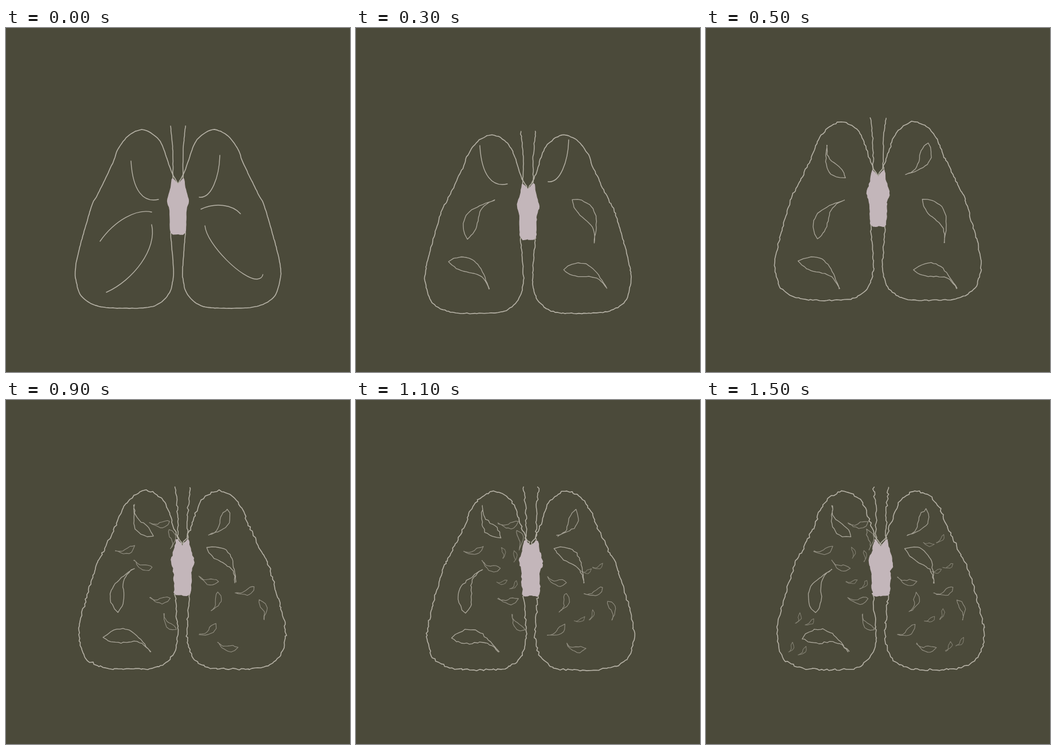
An HTML page with a canvas that plays this animation: 600 px wide and 600 px high, repeating every 1700 ms.

```html
<!DOCTYPE html>
<html lang="en">
<head>
<meta charset="utf-8">
<title>Breathing lungs</title>
<style>
  html, body { margin: 0; width: 100%; height: 100%; overflow: hidden; background: #4b4a3a; }
  canvas { display: block; }
</style>
</head>
<body>
<canvas id="stage" width="600" height="600"></canvas>
<script>
const ctx = document.getElementById('stage').getContext('2d');
const LOOP = 1700;
const STEP = 200;
const FULL_BREATH = 7;
const COLORS = { back: '#4b4a3a', line: '#b6b2a6', heart: '#c3b6ba' };

// Centre x and lung top for each step of the breath.
const POSES = [[300, 178], [304, 162], [300, 187], [300, 164], [307, 159],
  [307.5, 158.5], [304.5, 160], [304.5, 143.5], [304.5, 159.5]];

// Key points of the left half at rest; the right half is mirrored about x = 300.
const LUNG = [[300, 272], [288, 249], [273, 206], [262, 190], [245, 179], [232, 178], [212, 189],
  [195, 212], [186, 236], [160, 290], [149, 312], [128, 385], [121, 420], [122, 440], [131, 467],
  [152, 482], [180, 488], [242, 488], [268, 480], [285, 462], [291, 440], [292, 420], [287, 357]];
const TRACHEA = [[287, 171], [291, 215], [291, 263]];
const HEART = [[300, 272], [290, 262], [287, 278], [281, 302], [285, 318], [287, 357], [300, 360]];

const UPPER_VEINS = new Path2D('M218 232C221 285 240 305 266 299M373 222C372 260 358 298 337 295');
const LOWER_VEINS = new Path2D('M164 372C190 335 228 315 254 321M340 316C365 304 395 308 409 324' +
  'M175 461C222 440 264 385 254 343M347 345C350 378 414 440 438 438Q447 437 448 430');

// Leaves: centre x, y, direction in degrees from blunt to sharp end, length.
const YOUNG_LEAVES = [[227, 233, 240, 65], [368, 228, 125, 68], [218, 334, 305, 83],
  [396, 337, 63, 85], [197, 431, 34, 86], [400, 438, 23, 82]];
const GROWN_LEAVES = [[233, 230, 239, 64], [362, 232, 125, 56], [202, 352, 290, 82],
  [367, 307, 50, 79], [204, 446, 16, 85]];
const SIDE_LEAVES = [[261, 232, 176], [346, 331, 195], [278, 262, 85], [356, 371, 110],
  [201, 278, 167], [409, 350, 162], [232, 305, 203], [437, 385, 76],
  [261, 364, 181], [344, 419, 148], [279, 406, 232], [379, 447, 194]];
const BUD_PAIRS = [[261, 288], [260, 337], [407, 311], [395, 396],
  [167, 402], [393, 264], [154, 453], [427, 444]];

let seed = 1;
function random(low, high) {
  seed = (seed * 16807) % 2147483647;
  return low + (high - low) * seed / 2147483647;
}

const mirror = points => points.map(([x, y]) => [600 - x, y]);

// Each pair holds two buds side by side, tilted outwards.
seed = 99;
const BUDS = BUD_PAIRS.flatMap(([x, y]) => [-1, 1].map(side =>
  [x + 10 * side, y + (x < 300 ? 3 : -4) * side, random(85, 195), 19]));

// Catmull-Rom curve through the points, sampled about every 4 px.
function smooth(points) {
  const result = [];
  for (let i = 0; i < points.length - 1; i++) {
    const a = points[Math.max(i - 1, 0)], b = points[i], c = points[i + 1];
    const d = points[Math.min(i + 2, points.length - 1)];
    const steps = Math.max(1, Math.round(Math.hypot(c[0] - b[0], c[1] - b[1]) / 4));
    for (let k = 0; k < steps; k++) {
      const t = k / steps;
      result.push([0, 1].map(j => b[j] + 0.5 * t * (c[j] - a[j] +
        t * (2 * a[j] - 5 * b[j] + 4 * c[j] - d[j] + t * (3 * (b[j] - c[j]) + d[j] - a[j])))));
    }
  }
  return [...result, points[points.length - 1]];
}

function trace(points, rough) {
  ctx.beginPath();
  for (const [x, y] of points) ctx.lineTo(x + random(-rough, rough), y + random(-rough, rough));
}

function stroke(points, rough, width, alpha = 1) {
  trace(points, rough);
  ctx.lineWidth = width;
  ctx.globalAlpha = alpha;
  ctx.stroke();
  ctx.globalAlpha = 1;
}

// A crescent with a rounded head and a thin tail.
function drawLeaf([x, y, degrees, length], rough) {
  const angle = degrees * Math.PI / 180, cos = Math.cos(angle), sin = Math.sin(angle);
  const count = Math.max(5, Math.round(length / 4.5));
  const back = t => 0.3 * Math.sin(Math.PI * t ** 0.75);
  const belly = t => 0.06 * Math.sin(Math.PI * t) - 0.07 * Math.sin(2 * Math.PI * t);
  const points = [];
  for (let i = -count; i <= count; i++) {
    const t = Math.abs(i) / count;
    const along = (t - 0.5) * length, out = (i < 0 ? back(t) : belly(t)) * length;
    points.push([x + along * cos + out * sin, y + along * sin - out * cos]);
  }
  const size = Math.min(1, length / 65);
  stroke(points, rough * (0.45 + 0.3 * size), 0.9 + 0.4 * size, 0.4 + 0.5 * size);
}

function draw(step) {
  const [centre, top] = POSES[step];
  const swell = step === FULL_BREATH ? 1 : 0;
  const rough = Math.min(1.7, 0.3 + step * 0.25);
  const scaleX = 1 + 0.001 * step + 0.045 * swell, scaleY = 1 + 0.103 * swell;
  const heartScaleX = 1 + 0.015 * step + 0.27 * swell, heartScaleY = 1 + 0.27 * swell;
  const heartX = centre + 7 * (heartScaleX - 1), heartY = top + 133 * scaleY;

  // A full breath widens the upper lungs and rounds off the lower corners.
  const place = ([x, y, ...rest]) => {
    const side = Math.max(-1, Math.min(1, (x - 300) / 90));
    const bulge = 11 * swell * side * Math.sin(Math.PI * 1.3 * (y - 178) / 310);
    return [centre + (x - 300) * scaleX + bulge, top + (y - 178) * scaleY, ...rest];
  };
  const placeNeck = ([x, y]) => [heartX + (x - 300) * scaleX, top + (y - 178) * scaleY];
  const placeHeart = ([x, y]) => [heartX + (x - 300) * heartScaleX, heartY + (y - 311) * heartScaleY];

  seed = 4711 + step * 977;
  ctx.fillStyle = COLORS.back;
  ctx.fillRect(0, 0, 600, 600);
  ctx.strokeStyle = COLORS.line;
  ctx.lineJoin = ctx.lineCap = 'round';

  for (const side of [points => points, mirror]) {
    stroke(smooth(side(LUNG).map(place)), rough, 1.6);
    stroke(smooth(side(TRACHEA).map(placeNeck)), rough, 1.5);
  }

  trace(smooth([...HEART, ...mirror(HEART).reverse()].map(placeHeart)), rough * 0.8);
  ctx.fillStyle = COLORS.heart;
  ctx.fill();

  if (step < 3) drawVeins(step, centre, top);
  drawLeaves(step, rough, place, swell);
}

// The upper veins rise and outlast the lower ones.
function drawVeins(step, centre, top) {
  ctx.save();
  ctx.lineWidth = 1.4;
  if (step === 2) ctx.translate(-2, -27);
  else ctx.translate(centre - 300, top - 178);
  ctx.stroke(UPPER_VEINS);
  if (step < 2) ctx.stroke(LOWER_VEINS);
  ctx.restore();
}

function drawLeaves(step, rough, place, swell) {
  if (step < 2) return;
  if (step < 4) {
    YOUNG_LEAVES.slice(step === 2 ? 2 : 0).forEach(leaf => drawLeaf(leaf, rough));
    return;
  }
  const sideLeaves = SIDE_LEAVES.slice(0, (step - 3) * 6).map(leaf => [...leaf, 35]);
  const buds = BUDS.slice(0, Math.max(0, step - 5) * 8);
  for (const leaf of [...GROWN_LEAVES, ...sideLeaves, ...buds]) {
    const [x, y, degrees, length] = place(leaf);
    drawLeaf([x, y, degrees, length * (1 + 0.1 * swell)], rough);
  }
}

const start = performance.now();
let shown = -1;
function tick() {
  const time = (performance.now() - start) % LOOP;
  const step = Math.floor((time + STEP / 2) / STEP);
  if (step !== shown) draw(step);
  shown = step;
  requestAnimationFrame(tick);
}
tick();
</script>
</body>
</html>
```
